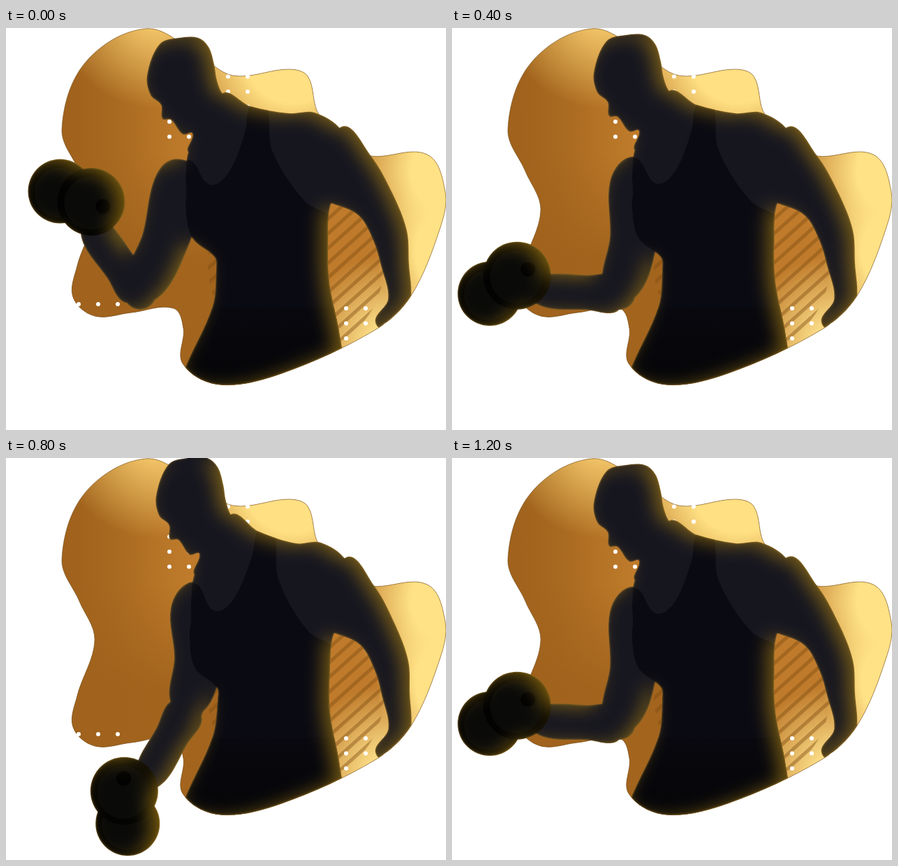
Animation of 630x575 px, one loop 1320 ms. Source, as an HTML page with a canvas:

```html
<!DOCTYPE html>
<html lang="en">
<head>
<meta charset="utf-8">
<title>Dumbbell curl</title>
<style>
html, body { margin: 0; width: 100%; height: 100%; overflow: hidden; background: #fff; }
canvas { display: block; }
</style>
</head>
<body>
<canvas id="stage" width="630" height="575"></canvas>
<script>
const W = 630, H = 575, TAU = Math.PI * 2;
const ctx = document.getElementById('stage').getContext('2d');

function layer() {
  const c = document.createElement('canvas');
  c.width = W;
  c.height = H;
  return c.getContext('2d');
}

const pts = s => s.trim().split(/\s+/).map(p => p.split(',').map(Number));
const clamp = (v, lo = 0, hi = 1) => Math.min(hi, Math.max(lo, v));
const dist = (a, b) => Math.hypot(b[0] - a[0], b[1] - a[1]);
const polar = ([x, y], r, deg) => {
  const a = deg * Math.PI / 180;
  return [x + r * Math.cos(a), y + r * Math.sin(a)];
};

// Closed curve through the points; handles scale with each span, so it never overshoots
function smooth(p) {
  const path = new Path2D(), n = p.length, at = i => p[(i + n) % n];
  const dir = i => {
    const a = at(i - 1), b = at(i + 1), d = dist(a, b) || 1;
    return [(b[0] - a[0]) / d, (b[1] - a[1]) / d];
  };
  path.moveTo(...p[0]);
  for (let i = 0; i < n; i++) {
    const b = at(i), c = at(i + 1), u = dir(i), v = dir(i + 1), k = dist(b, c) / 3;
    path.bezierCurveTo(b[0] + u[0] * k, b[1] + u[1] * k, c[0] - v[0] * k, c[1] - v[1] * k, c[0], c[1]);
  }
  path.closePath();
  return path;
}

// Tapered tube around a spine of [x, y, radius]
function limb(spine) {
  const left = [], right = [], last = spine.length - 1;
  spine.forEach(([x, y, r], i) => {
    const a = spine[Math.max(0, i - 1)], b = spine[Math.min(last, i + 1)], d = dist(a, b);
    const nx = (b[1] - a[1]) / d * r, ny = (a[0] - b[0]) / d * r;
    left.push([x + nx, y + ny]);
    right.unshift([x - nx, y - ny]);
  });
  return smooth([...left, ...right]);
}

const blob = smooth(pts(`200,1 113,50 80,145 105,205 127,260 102,340 96,385 127,412 180,407
  240,401 254,430 253,480 305,510 395,494 530,431 580,383 622,285 629,235 603,181 515,181
  449,125 432,69 405,59 325,68 273,36`));

const head = pts(`302,75 311,95 340,118 320,180 262,178 267,151 253,152 236,131 224,130 222,110
  207,96 202,68 220,23 248,14 275,14 290,27 298,52`);

const trunk = pts(`262,175 309,94 350,112 405,122 442,121 480,146 500,200 466,249 461,310 463,365
  477,435 484,500 470,530 270,530 250,515 255,490 296,398 301,345 299,328 266,299 257,250 258,205`);

const restArm = pts(`450,190,56 495,217,44 529,252,29 550,297,25 557,338,20 563,390,16 542,428,15`);

const tank = pts(`258,190 268,192 292,224 318,208 342,150 351,108 372,108 381,175 427,247 470,277
  490,400 490,560 230,560 250,400 230,310 257,250`);

// From the top of the curl to the bottom: upper body shift, shoulder, elbow, forearm angle
const poses = [
  { sway: [-12, 10], shoulder: 243, elbow: [173, 368], angle: 264 },
  { sway: [0, 0], shoulder: 245, elbow: [192, 380], angle: 242 },
  { sway: [1, -4], shoulder: 260, elbow: [240, 380], angle: 190 },
  { sway: [12, -6], shoulder: 270, elbow: [262, 365], angle: 165.5 },
  { sway: [13, -13], shoulder: 270, elbow: [258, 358], angle: 139.7 },
  { sway: [13, -14], shoulder: 270, elbow: [260, 358], angle: 127.5 }
];

const LOOP = 1320;
const starts = [0, 120, 280, 400, 520, 680, 800, 920, 1080, 1200];
const bounce = i => 5 - Math.abs(5 - Math.abs(i - 1));

// The hips stay put; the shift grows towards the head
const lean = (list, [dx, dy]) => list.map(([x, y, r]) => {
  const wx = clamp((400 - y) / 330) * (1 - clamp((x - 380) / 300, 0, 0.5));
  const wy = clamp((400 - x) / 100) * clamp((270 - y) / 120);
  return [x + dx * wx, y + dy * wy, r];
});

function circle(c, [x, y], r, fill) {
  c.fillStyle = fill;
  c.beginPath();
  c.arc(x, y, r, 0, TAU);
  c.fill();
}

function light(c, x, y, r, rgb, core) {
  const g = c.createRadialGradient(x, y, r * core, x, y, r);
  g.addColorStop(0, `rgba(${rgb},1)`);
  g.addColorStop(1, `rgba(${rgb},0)`);
  c.fillStyle = g;
  c.fillRect(0, 0, W, H);
}

function dots(c, x, y, cols, rows) {
  for (let i = 0; i < cols; i++)
    for (let j = 0; j < rows; j++) circle(c, [x + i * 28, y + j * 21.5], 3, '#fff');
}

function stripes(c) {
  c.save();
  c.beginPath();
  c.arc(415, 340, 126, 0, TAU);
  c.clip();
  c.strokeStyle = 'rgba(125,75,18,.42)';
  c.lineWidth = 5;
  for (let y = 142; y < 560; y += 21) {
    c.beginPath();
    c.moveTo(280, y + 126);
    c.lineTo(560, y - 126);
    c.stroke();
  }
  c.restore();
}

function paintBackdrop(c) {
  c.save();
  c.clip(blob);
  const g = c.createLinearGradient(90, 0, 260, 0);
  g.addColorStop(0, '#a0621c');
  g.addColorStop(0.4, '#a86a20');
  g.addColorStop(1, '#bf7b2b');
  c.fillStyle = g;
  c.fillRect(0, 0, W, H);
  const shade = c.createLinearGradient(0, 180, 0, 330);
  shade.addColorStop(0, 'rgba(160,98,28,0)');
  shade.addColorStop(1, 'rgba(160,98,28,.9)');
  c.fillStyle = shade;
  c.fillRect(0, 0, 310, H);
  light(c, 215, -30, 145, '248,205,110', 0.12);
  light(c, 410, 40, 160, '255,224,131', 0.42);
  light(c, 640, 205, 150, '255,226,134', 0.4);
  light(c, 655, 320, 125, '255,226,134', 0.55);
  light(c, 550, 455, 130, '255,226,140', 0.2);
  stripes(c);
  c.restore();
  c.strokeStyle = 'rgba(115,80,35,.6)';
  c.stroke(blob);
  dots(c, 234, 69.5, 5, 5);
  dots(c, 487, 401, 3, 3);
  dots(c, 104, 395, 3, 1);
}

function plate(c, [x, y], r) {
  const g = c.createLinearGradient(x - r, y, x + r, y - r * 0.3);
  g.addColorStop(0, '#020202');
  g.addColorStop(0.6, '#050503');
  g.addColorStop(1, '#1a1404');
  circle(c, [x, y], r, g);
  circle(c, [x - 1, y + 2], r * 0.78, 'rgba(22,22,20,.38)');
}

function paintCurl(c, { sway, shoulder, elbow, angle }) {
  const [ex, ey] = elbow, sy = 225 + sway[1] * 0.7, bone = angle - 8;
  c.fillStyle = '#17171f';
  c.fill(limb([
    [shoulder + 8, sy - 32, 18], [shoulder, sy, 34],
    [(shoulder + ex) / 2 + 10, (sy + ey) / 2, 34], [ex, ey, 23]
  ]));
  c.fill(limb([[ex, ey, 23], [...polar(elbow, 45, bone), 25], [...polar(elbow, 120, bone), 18]]));
  circle(c, elbow, 23, '#17171f');

  const front = polar(elbow, 149, angle);
  plate(c, polar(front, 47, angle - 43.5), 46);
  plate(c, front, 48.5);
  circle(c, polar(front, 18, angle + 140), 10.5, '#020202');
}

// The hips and the resting hand end at the blob's lower edge
const mask = new Path2D(blob);
mask.rect(W, 0, -W, 300);

function paintFigure(c, pose) {
  const body = lean(trunk, pose.sway);
  c.clearRect(0, 0, W, H);
  paintCurl(c, pose);
  c.save();
  c.clip(mask);
  c.fillStyle = '#16161f';
  c.fill(limb(lean(restArm, pose.sway)));
  c.fill(smooth(body));
  c.fill(smooth(lean(head, pose.sway)));
  c.clip(smooth(body));
  c.fillStyle = '#0a0a12';
  c.fill(smooth(lean(tank, pose.sway)));
  const g = c.createLinearGradient(0, 400, 0, 520);
  g.addColorStop(0, '#08080e');
  g.addColorStop(1, '#050507');
  c.fillStyle = g;
  c.fillRect(230, 400, 260, 160);
  c.restore();
}

// Warm rim light: the blurred outside laid back over the figure
function rimLight(c) {
  const glow = (color, blur, alpha, dx, dy) => {
    inv.globalCompositeOperation = 'copy';
    inv.fillStyle = color;
    inv.fillRect(0, 0, W, H);
    inv.globalCompositeOperation = 'destination-out';
    inv.drawImage(c.canvas, 0, 0);
    c.save();
    c.globalCompositeOperation = 'source-atop';
    c.filter = `blur(${blur}px)`;
    c.globalAlpha = alpha;
    c.drawImage(inv.canvas, dx, dy);
    c.restore();
  };
  glow('#a07a14', 12, 0.65, -11, 4);
  glow('#c08c30', 1.8, 0.8, 0, 0);
}

const back = layer(), fig = layer(), inv = layer();
paintBackdrop(back);

function draw(pose) {
  paintFigure(fig, pose);
  rimLight(fig);
  ctx.fillStyle = '#fff';
  ctx.fillRect(0, 0, W, H);
  ctx.drawImage(back.canvas, 0, 0);
  ctx.drawImage(fig.canvas, 0, 0);
}

const begin = performance.now();
let shown = -1;
function tick() {
  const t = Math.max(0, performance.now() - begin) % LOOP;
  const index = bounce(starts.filter(s => s <= t).length - 1);
  if (index !== shown) draw(poses[shown = index]);
  requestAnimationFrame(tick);
}
tick();
</script>
</body>
</html>
```
